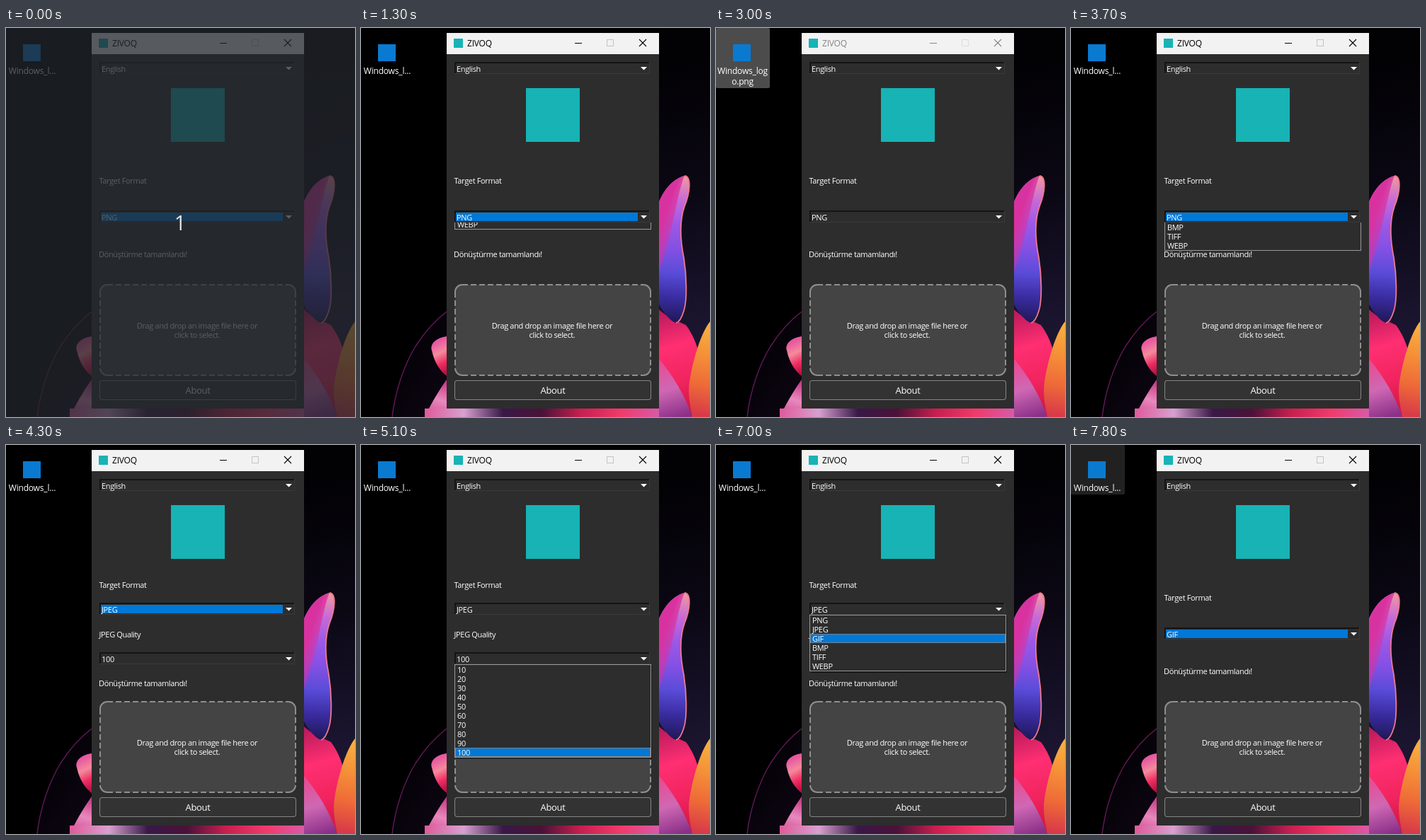
An HTML page with a canvas that plays this animation: 493 by 550 pixels, repeating every 8000 ms.

```html
<!DOCTYPE html>
<html lang="en">
<head>
<meta charset="utf-8">
<title>Image converter</title>
<style>
  html, body { margin: 0; width: 100%; height: 100%; overflow: hidden; background: #000; }
  canvas { display: block; width: 493px; height: 550px; }
</style>
</head>
<body>
<canvas id="stage" width="493" height="550"></canvas>
<script>
const ctx = document.getElementById('stage').getContext('2d');
const LOOP = 8000;
const FONT = '"Open Sans", "Noto Sans", sans-serif';
const BLUE = '#0078d7', TEAL = '#17b3b5', PANEL = '#2d2d2d';
const FORMATS = ['PNG', 'JPEG', 'GIF', 'BMP', 'TIFF', 'WEBP'];
const QUALITIES = Array.from({ length: 10 }, (_, i) => String(10 * (i + 1)));

// Each step patches the state of the interface from its time on.
const STEPS = [
  [0, { dim: true, active: true, format: 'PNG', focus: 'format', icon: '', popup: '', hover: 0, show: 0 }],
  [100, { dim: false }],
  [1300, { popup: 'format', show: 10 }],
  [1400, { show: 62 }],
  [1500, { show: 200, focus: '' }],
  [2400, { popup: '', focus: 'format' }],
  [2500, { active: false, focus: '', icon: 'hover' }],
  [2600, { icon: 'pressed' }],
  [3000, { icon: 'selected' }],
  [3600, { active: true, focus: 'format', icon: '' }],
  [3700, { popup: 'format', show: 40 }],
  [3800, { show: 200, focus: '' }],
  [4100, { hover: 1 }],
  [4300, { popup: '', format: 'JPEG', focus: 'format' }],
  [4900, { popup: 'quality', show: 36, focus: 'quality', hover: 9 }],
  [5000, { show: 100 }],
  [5100, { show: 200, focus: '' }],
  [5300, { popup: '', focus: 'quality' }],
  [6300, { popup: 'format', show: 34, focus: 'format', hover: 1 }],
  [6400, { show: 66 }],
  [6500, { show: 200, focus: '' }],
  [7000, { hover: 2 }],
  [7300, { popup: '', format: 'GIF', focus: 'format' }],
  [7800, { icon: 'hover' }]
];

function stateAt(t) {
  const state = {};
  for (const [start, patch] of STEPS) if (t >= start) Object.assign(state, patch);
  return state;
}

function rect(x, y, w, h, fill) {
  ctx.fillStyle = fill;
  ctx.fillRect(x, y, w, h);
}

function text(str, x, y, { size = 11, color = '#fff', align = 'left', gap = -0.35 } = {}) {
  ctx.font = `${size}px ${FONT}`;
  ctx.letterSpacing = gap + 'px';
  ctx.textAlign = align;
  ctx.fillStyle = color;
  ctx.fillText(str, x, y);
}

function line(color, width, ...points) {
  ctx.strokeStyle = color;
  ctx.lineWidth = width;
  ctx.beginPath();
  for (const [x, y] of points) ctx.lineTo(x, y);
  ctx.stroke();
}

function rounded(x, y, w, h, r, fill) {
  ctx.beginPath();
  ctx.roundRect(x, y, w, h, r);
  ctx.fillStyle = fill;
  ctx.fill();
}

function petal(path, [x0, y0, x1, y1], ...colors) {
  const g = ctx.createLinearGradient(x0, y0, x1, y1);
  colors.forEach((c, i) => g.addColorStop(i / (colors.length - 1), c));
  ctx.fillStyle = g;
  ctx.fill(new Path2D(path));
}

function outline(path, color, width) {
  ctx.strokeStyle = color;
  ctx.lineWidth = width;
  ctx.stroke(new Path2D(path));
}

function wallpaper() {
  rect(0, 0, 493, 550, '#000');
  petal('M421 0H493V550H421Z', [400, 60, 493, 420], '#020104', '#0b0814', '#1b1530');

  const arc = 'M44 550C48 515 60 478 77 450C90 430 105 413 121 401';
  petal(arc + 'V550Z', [60, 480, 121, 520], '#050208', '#0d0612');
  outline(arc, '#651a5a', 1.4);

  petal('M121 436C107 438 97 446 100 456C104 474 112 485 121 492Z', [101, 448, 121, 488],
    '#e85aa0', '#f58a9c', '#ee2c62', '#b5103f');
  petal('M121 497C109 514 98 533 90 550H121Z', [118, 500, 100, 550], '#c83a86', '#e889bd', '#d24a94');
  petal('M90 538H421V550H90Z', [90, 0, 421, 0],
    '#e05a9a', '#d8a0d0', '#3a1848', '#4a1238', '#c81f50', '#f03a6a', '#d85aa8');

  petal('M421 398C436 412 452 416 459 420C468 432 474 446 478 462L493 500V550H421Z', [425, 400, 470, 550],
    '#b81a5c', '#ff2f72', '#f0245e', '#c8143c');
  petal('M421 468C440 490 458 520 468 550H421Z', [425, 470, 450, 550], '#e84a90', '#cf68b4', '#8a3088');
  petal('M493 415C480 432 470 465 464 500C461 520 466 538 468 550H493Z', [493, 420, 468, 545],
    '#f8b040', '#f59038', '#ee6a38', '#d83a48');

  const edge = 'M457 209C467 210 465 232 457 252C449 275 451 300 456 325C460 350 461 385 456 400C453 410 449 416 445 417';
  const leaf = edge + 'C436 414 427 402 421 391V246C426 233 438 214 457 209Z';
  petal(leaf, [450, 209, 436, 415], '#f09aa0', '#c66ad8', '#9c58e6', '#8450e4', '#5a4cd8', '#3a2ca0', '#201858');
  petal('M421 246C426 233 438 214 457 209C446 235 441 290 421 345Z', [421, 290, 450, 300],
    '#d832a0', '#d832a080', '#d832a000');
  outline(edge, '#f0788c', 1.8);
}

function desktopIcon(mode) {
  const open = mode === 'selected' || mode === 'pressed';
  const fill = { hover: '#212121', selected: '#4c4c4c', pressed: '#5c5c5c' }[mode];
  if (fill) rounded(0, 0, 76, open ? 85 : 70, 2, fill);
  rect(24, 23, 25, 24, '#0a7ad1');
  const style = { size: 12, align: 'center', gap: -0.2 };
  if (open) {
    text('Windows_log', 37.5, 65, style);
    text('o.png', 37.5, 80, style);
  } else {
    text('Windows_l...', 37, 65, style);
  }
}

function titleBar(active) {
  const ink = active ? '#000' : '#858585';
  rect(121, 7, 300, 30, '#f2f2f2');
  rect(131, 15, 13, 13, TEAL);
  text('ZIVOQ', 150, 26, { size: 12, color: ink, gap: -0.2 });
  rect(302, 21, 10, 1, ink);
  ctx.strokeStyle = active ? '#c4c4c4' : '#dcdcdc';
  ctx.lineWidth = 1;
  ctx.strokeRect(347.5, 16.5, 9, 9);
  line(ink, 1.1, [393, 16], [403, 26]);
  line(ink, 1.1, [403, 16], [393, 26]);
}

function combo(y, value, focused) {
  rect(132, y - 1, 276, 17, '#3a3a3a');
  rect(132, y - 1, 275, 16, '#141414');
  rect(134, y + 1, 273, 14, PANEL);
  if (focused) rect(134, y + 2, 257, 12, BLUE);
  ctx.fillStyle = '#fff';
  ctx.beginPath();
  ctx.moveTo(395, y + 6);
  ctx.lineTo(404, y + 6);
  ctx.lineTo(399.5, y + 10.5);
  ctx.fill();
  text(value, 135, y + 12.5);
}

// The list slides down from under its combo box.
function popup(top, items, hover, show) {
  const height = items.length * 13 + 2;
  const shift = Math.min(0, show - height);
  ctx.save();
  ctx.beginPath();
  ctx.rect(132, top, 280, height + 3);
  ctx.clip();
  ctx.translate(0, top + shift);
  if (shift === 0) rect(134, 2, 277, height, 'rgba(0, 0, 0, 0.45)');
  rect(132, 0, 278, height, '#9a9a9a');
  rect(133, 1, 276, height - 2, PANEL);
  items.forEach((item, i) => {
    const y = 1 + 13 * i;
    if (i === hover) {
      rect(133, y, 276, 13, BLUE);
      ctx.strokeStyle = '#ff872a';
      ctx.lineWidth = 1;
      ctx.setLineDash([1, 1]);
      ctx.strokeRect(133.5, y + 0.5, 275, 12);
      ctx.setLineDash([]);
    }
    text(item, 136, y + 10.5);
  });
  ctx.restore();
}

// Solid corners joined by dashed edges.
function dropZone() {
  const [l, t, r, b, rad] = [133, 363, 409, 491, 10];
  const color = '#8f8f8f';
  rounded(l, t, r - l, b - t, rad, '#444');
  ctx.strokeStyle = color;
  ctx.lineWidth = 2;
  [[r - rad, b - rad], [l + rad, b - rad], [l + rad, t + rad], [r - rad, t + rad]].forEach(([x, y], i) => {
    ctx.beginPath();
    ctx.arc(x, y, rad, i * Math.PI / 2, (i + 1) * Math.PI / 2);
    ctx.stroke();
  });
  ctx.setLineDash([8, 4]);
  for (const y of [t, b]) line(color, 2, [l + rad, y], [r - rad, y]);
  for (const x of [l, r]) line(color, 2, [x, t + rad], [x, b - rad]);
  ctx.setLineDash([]);
  text('Drag and drop an image file here or', 270, 425, { align: 'center' });
  text('click to select.', 270, 438, { align: 'center' });
}

function aboutButton() {
  rounded(132, 498, 278, 28, 4, '#858585');
  rounded(133, 499, 276, 26, 3, '#333');
  text('About', 271, 517, { size: 13, align: 'center' });
}

function appWindow(s) {
  const jpeg = s.format === 'JPEG';
  const rows = { format: jpeg ? 224 : 259, quality: 294 };
  rect(121, 7, 300, 531, PANEL);
  titleBar(s.active);
  combo(49, 'English', false);
  rect(233, 85, 76, 76, TEAL);

  text('Target Format', 131.5, jpeg ? 202 : 220);
  combo(rows.format, s.format, s.focus === 'format');
  if (jpeg) {
    text('JPEG Quality', 131.5, 272);
    combo(rows.quality, '100', s.focus === 'quality');
  }
  text('Dönüştürme tamamlandı!', 131, jpeg ? 341 : 324);
  dropZone();
  aboutButton();

  if (s.popup) {
    popup(rows[s.popup] + 16, s.popup === 'format' ? FORMATS : QUALITIES, s.hover, s.show);
  }
}

function countdown() {
  rect(0, 0, 493, 550, 'rgba(34, 39, 44, 0.74)');
  text('1', 246, 286, { size: 29, align: 'center', color: '#e4e4e4', gap: 0 });
}

function draw(now) {
  const s = stateAt(now % LOOP);
  wallpaper();
  desktopIcon(s.icon);
  appWindow(s);
  if (s.dim) countdown();
}

const start = performance.now();
function tick() {
  draw(performance.now() - start);
  requestAnimationFrame(tick);
}
tick();
</script>
</body>
</html>
```
